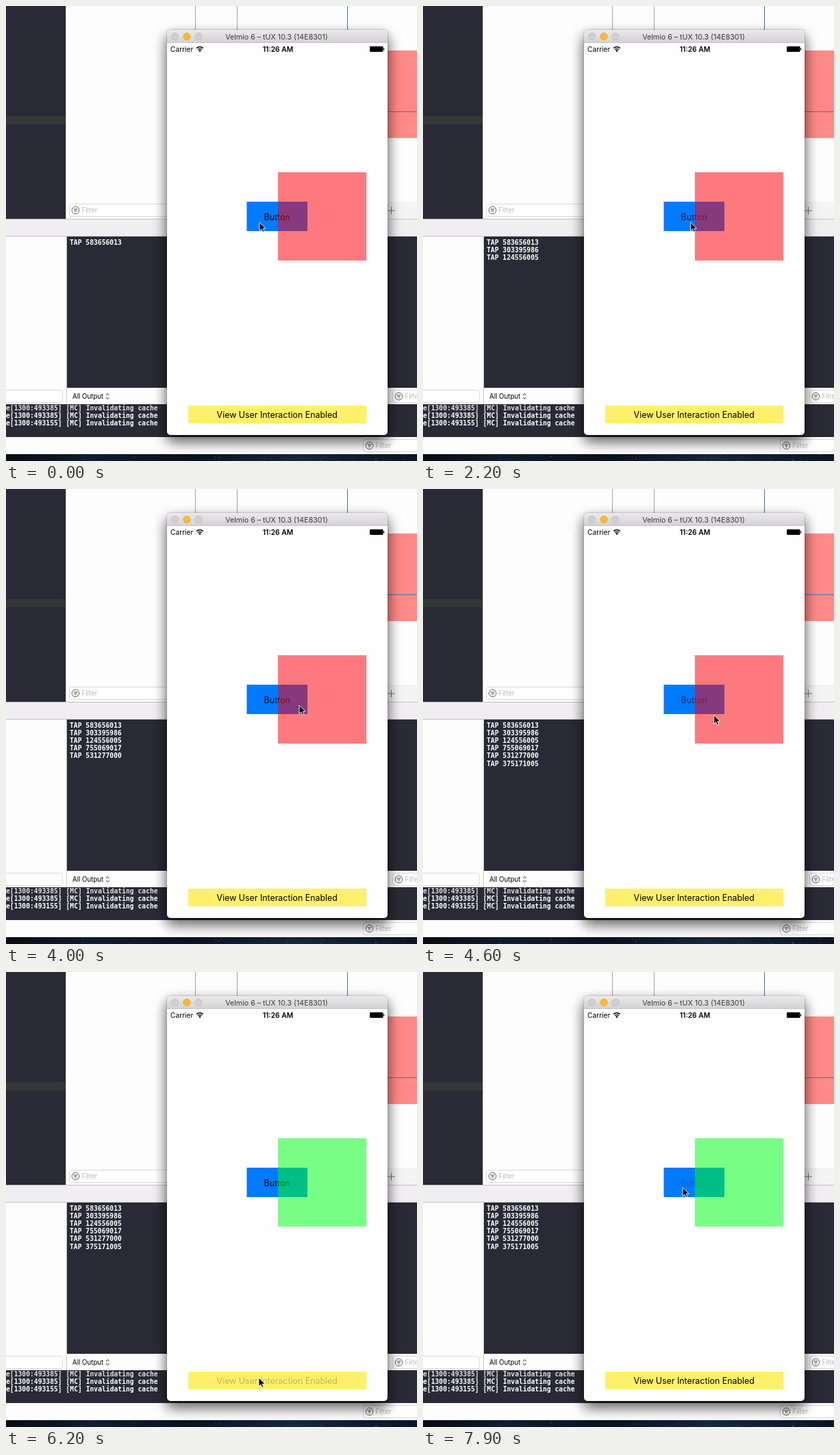
These frames come from a looping animation (600x665 px, 8 s). An HTML page:

```html
<!DOCTYPE html>
<html lang="en">
<head>
<meta charset="utf-8">
<title>Overlapping views</title>
<style>
html, body { margin: 0; width: 100%; height: 100%; overflow: hidden; background: #fff; }
svg { display: block; font-family: Inter, Roboto, sans-serif; }
.mono { font: bold 9.7px "DejaVu Sans Mono", monospace; fill: #fff; white-space: pre; }
.small { font-size: 9.7px; }
.label { font-size: 12.4px; text-anchor: middle; }
.hint { fill: #b9b9b9; }
.shadow { filter: drop-shadow(0 9px 10px rgba(0,0,0,.55)) drop-shadow(0 0 1px rgba(0,0,0,.35)); }
</style>
</head>
<body>
<svg width="600" height="665" viewBox="0 0 600 665">
  <defs>
    <linearGradient id="bar" x2="0" y2="1">
      <stop stop-color="#ebe9eb"/><stop offset="1" stop-color="#d3d1d3"/>
    </linearGradient>
    <linearGradient id="desk">
      <stop stop-color="#080b12"/><stop offset=".2" stop-color="#101c30"/>
      <stop offset=".45" stop-color="#0a1220"/><stop offset=".7" stop-color="#15263f"/>
      <stop offset="1" stop-color="#0b1423"/>
    </linearGradient>
    <g id="filter">
      <rect x=".5" y=".5" width="150" height="18" rx="3.5" fill="#fff" stroke="#d9d9d9"/>
      <circle cx="9.5" cy="9.5" r="5.3" fill="none" stroke="#555"/>
      <path d="M6.5 7.8h6M7.5 9.8h4M8.5 11.8h2" stroke="#555"/>
      <text x="18.5" y="13" class="small hint">Filter</text>
    </g>
  </defs>

  <!-- editor -->
  <rect width="600" height="665" fill="#fdfdfd"/>
  <rect width="87" height="311" fill="#292a35"/>
  <rect y="161" width="87" height="12" fill="#353637"/>
  <path d="M87.5 0V311" stroke="#c4c4c4"/>
  <path d="M276.5 0V40M337.5 0V40" stroke="#a3a3a3"/>
  <path d="M498.5 0V40" stroke="#3c78a8"/>
  <rect x="540" y="65" width="60" height="128" fill="#ff8a87"/>
  <path d="M540 154.5H600" stroke="#4779ac"/>
  <rect x="540" y="286" width="60" height="25" fill="#f5f4f5"/>
  <path d="M557 299H568M562.5 293.5V304.5" stroke="#777"/>
  <use href="#filter" x="92" y="289"/>
  <rect y="311" width="600" height="26" fill="#f0eef0"/>
  <path d="M0 311.5H600M0 336.5H600" stroke="#c3c1c3"/>

  <!-- console -->
  <rect x="88" y="337" width="512" height="221" fill="#292a35"/>
  <path d="M88.5 337V582" stroke="#d0d0d0"/>
  <rect x="-9.5" y="561.5" width="92" height="18" rx="3.5" fill="#fff" stroke="#d9d9d9"/>
  <text x="97" y="574" class="small">All Output</text>
  <path d="M146 569l2.3-2.6 2.3 2.6M146 572l2.3 2.6 2.3-2.6" fill="none" stroke="#333"/>
  <use href="#filter" x="564" y="561"/>
  <g id="log" class="mono"></g>
  <rect y="582" width="600" height="48" fill="#292a35"/>
  <g class="mono">
    <text y="591" opacity=".85">e[1300:493385] [MC] Invalidating cache</text>
    <text y="602">e[1300:493385] [MC] Invalidating cache</text>
    <text y="613">e[1300:493155] [MC] Invalidating cache</text>
  </g>
  <use href="#filter" x="521" y="633"/>
  <rect y="655" width="600" height="10" fill="url(#desk)"/>
  <g id="stars" fill="#54789c"></g>

  <!-- simulator window -->
  <rect class="shadow" x="235" y="35" width="322" height="592" rx="5" fill="#fefefe"/>
  <path d="M235 54V40a5 5 0 0 1 5-5H552a5 5 0 0 1 5 5V54z" fill="url(#bar)"/>
  <path d="M235 53.5H557" stroke="#c4c2c4"/>
  <g stroke-width=".6">
    <circle cx="246.5" cy="44.5" r="5.2" fill="#d0cfd0" stroke="#b9b8b9"/>
    <circle cx="264" cy="44.5" r="5.2" fill="#fdb92f" stroke="#dd9f32"/>
    <circle cx="281" cy="44.5" r="5.2" fill="#d0cfd0" stroke="#b9b8b9"/>
  </g>
  <text x="395" y="48.5" font-size="10.7" fill="#3c3c3c" text-anchor="middle">Velmio 6 – tUX 10.3 (14E8301)</text>
  <text x="240" y="66.5" font-size="10.2">Carrier</text>
  <g fill="none" stroke="#000" stroke-width="1.5">
    <path d="M278.2 61.6a7 7 0 0 1 9.6 0M280.1 63.8a4.2 4.2 0 0 1 5.8 0"/>
  </g>
  <path d="M281.2 65.2a2.5 2.5 0 0 1 3.6 0L283 67.2z"/>
  <text x="397" y="66.5" font-size="10.3" font-weight="600" text-anchor="middle">11:26 AM</text>
  <rect x="531" y="59" width="19.5" height="8" rx="1.3"/>
  <rect x="551" y="61.5" width="1.2" height="3" rx=".5"/>

  <rect x="351.5" y="286" width="88.5" height="43" fill="#007aff"/>
  <text id="button" x="395.7" y="312.5" class="label">Button</text>
  <rect id="square" x="397" y="243" width="129" height="129" fill-opacity=".52"/>
  <rect x="266" y="584" width="260" height="26" fill="#fff06c"/>
  <text id="toggle" x="395.7" y="602" class="label">View User Interaction Enabled</text>

  <path id="cursor" d="M0 0V12.6L2.9 9.9L4.9 14.3L7 13.4L5.1 9.1H9.1Z" stroke="#fff" stroke-width=".9"/>
</svg>
<script>
const LOOP = 8000, STEP = 100, DIM = 0.2, FADE = 470;
const $ = id => document.getElementById(id);

// [press, release, logged number]
const buttonTaps = [
  [-700, -550, 583656013], [1100, 1270, 303395986], [1750, 1900, 124556005],
  [2650, 2830, 755069017], [3450, 3600, 531277000], [4200, 4350, 375171005],
  [7800, 8100]
];
const toggleTaps = [[6000, 6180]];
// [time, x, y]
const route = [
  [0, 370, 316], [2000, 370, 316], [2500, 428, 316], [4500, 428, 316],
  [5200, 369, 580], [5300, 369, 584], [5700, 369, 593], [6600, 369, 593],
  [7400, 379, 315], [LOOP, 379, 315]
];

const lines = buttonTaps.filter(tap => tap[2]).map(([, release, number], i) => {
  const line = document.createElementNS("http://www.w3.org/2000/svg", "text");
  line.textContent = "TAP " + number;
  line.setAttribute("x", 93);
  line.setAttribute("y", 349 + i * 11.1);
  $("log").append(line);
  return { line, release };
});

let seed = 7;
const random = () => (seed = seed * 16807 % 2147483647) / 2147483647;
for (let i = 0; i < 70; i++) {
  const star = document.createElementNS("http://www.w3.org/2000/svg", "circle");
  star.setAttribute("cx", 85 + random() * 515);
  star.setAttribute("cy", 656 + random() * 9);
  star.setAttribute("r", 0.3 + random() * 0.5);
  star.setAttribute("opacity", 0.2 + random() * 0.5);
  $("stars").append(star);
}

function textAlpha(taps, t) {
  const last = taps.filter(([press]) => press <= t).pop();
  if (!last) return 1;
  const k = Math.min(1, Math.max(0, (t - last[1]) / FADE));
  return DIM + (1 - DIM) * k;
}

function cursorAt(t) {
  const i = route.findIndex(([time]) => time > t);
  const [t0, x0, y0] = route[i - 1], [t1, x1, y1] = route[i];
  const k = (t - t0) / (t1 - t0), ease = k * k * (3 - 2 * k);
  return [x0 + (x1 - x0) * ease, y0 + (y1 - y0) * ease];
}

function draw(t) {
  $("button").setAttribute("opacity", textAlpha(buttonTaps, t));
  $("toggle").setAttribute("opacity", textAlpha(toggleTaps, t));
  $("square").setAttribute("fill", t >= toggleTaps[0][1] ? "rgb(0,255,24)" : "rgb(255,0,8)");
  $("cursor").setAttribute("transform", `translate(${cursorAt(t)})`);
  for (const { line, release } of lines) line.setAttribute("opacity", t >= release ? 1 : 0);
}

const start = performance.now();
function tick() {
  const t = (performance.now() - start) % LOOP;
  draw(Math.floor(t / STEP) * STEP);
  requestAnimationFrame(tick);
}
tick();
</script>
</body>
</html>
```
